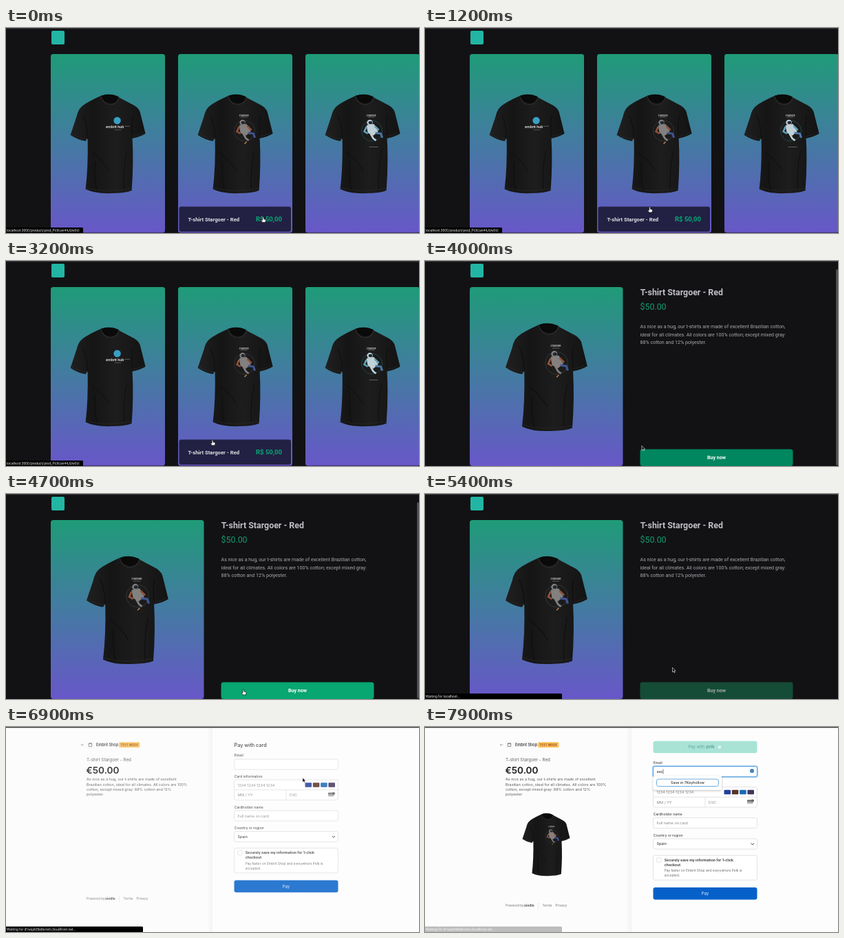
An HTML page that plays this animation: 600x299 px, repeating every 8 s.

```html
<!DOCTYPE html>
<html lang="en">
<head>
<meta charset="utf-8">
<title>Shop checkout</title>
<style>
  html, body { margin: 0; width: 100%; height: 100%; overflow: hidden; background: #121214; }
  svg { display: block; width: 100vw; height: 100vh; }
  .shop { font-family: Roboto, sans-serif; }
  .pay { font-family: Inter, sans-serif; }
  .status { font-family: Roboto, sans-serif; font-size: 5px; }
</style>
</head>
<body>
<svg id="stage" viewBox="0 0 600 299" preserveAspectRatio="none"></svg>
<script>
const LOOP = 8000;
const T = { product: 3700, scrollEnd: 4800, buy: 5100, checkout: 6600, shirt: 7250, focus: 7350, typing: 7600, shift: 7700 };
const PRODUCT = 'T-shirt Stargoer - Red';
const SHOP = 'Embrit Shop';
const SHIFT = 10.5;

const rect = (x, y, w, h, fill, r = 0, more = '') =>
  `<rect x="${x}" y="${y}" width="${w}" height="${h}" rx="${r}" fill="${fill}" ${more}/>`;
const text = (x, y, size, fill, str, more = '') =>
  `<text x="${x}" y="${y}" font-size="${size}" fill="${fill}" ${more}>${str}</text>`;
const path = (d, more) => `<path d="${d}" ${more}/>`;
const group = (id, body, more = '') => `<g id="${id}" ${more}>${body}</g>`;
const BOLD = 'font-weight="700"', SEMI = 'font-weight="600"', MEDIUM = 'font-weight="500"', MID = 'text-anchor="middle"';

const defs = `<defs>
  <linearGradient id="card" x2="0" y2="1"><stop stop-color="#1f9b78"/><stop offset=".5" stop-color="#447aa2"/><stop offset="1" stop-color="#6857c8"/></linearGradient>
  <linearGradient id="cloth"><stop stop-color="#202020"/><stop offset=".3" stop-color="#151515"/><stop offset=".6" stop-color="#1d1d1d"/><stop offset="1" stop-color="#131313"/></linearGradient>
  <linearGradient id="edge"><stop stop-color="#000" stop-opacity="0"/><stop offset="1" stop-color="#000" stop-opacity=".035"/></linearGradient>
  <filter id="soft" x="-20%" y="-40%" width="140%" height="200%"><feDropShadow dx="0" dy="1.2" stdDeviation="1.8" flood-opacity=".25"/></filter>
</defs>`;

const cloth =
  path('M44 2Q24 11 17 17Q11 22 9 32L0 59Q10 66 22 68L25 63Q26 105 22 138Q36 145 60 144Q80 144 89 140Q92 100 90 64Q101 62 109 57L101 25Q98 18 89 14L70 4Q58-3 44 2Z', 'fill="url(#cloth)"') +
  path('M44 2Q57-3 70 3Q68 13 58 13Q48 12 44 2Z', 'fill="#0a0a0a"') +
  path('M44 2Q47 14 58 15Q68 14 71 4', 'fill="none" stroke="#2b2b2b" stroke-width="1.2"') +
  path('M18 30Q25 45 25 65M91 62Q87 48 91 30M36 98Q34 125 39 140M82 82Q76 112 78 139M30 84Q44 92 56 112', 'fill="none" stroke="#0b0b0b" stroke-width="1" opacity=".7"') +
  path('M2 57Q12 64 23 65M90 61Q100 60 107 55M23 136Q50 144 89 137', 'fill="none" stroke="#2a2a2a" stroke-width=".6"');

const astronaut = (suit, arm, leg, ring) =>
  text(67, 31.5, 2.7, '#c4c4c4', 'STARGOER', MID + ' ' + BOLD) +
  rect(62, 32.8, 10, .6, '#777') +
  `<circle cx="68" cy="53" r="15" fill="none" stroke="${ring}" stroke-width=".6"/>` +
  path('M60 45L71 43L77 54L70 60L62 56Z', `fill="${suit}"`) +
  `<circle cx="65" cy="41" r="4.2" fill="${suit}"/><ellipse cx="65.8" cy="41" rx="2.8" ry="2.3" fill="#222933"/>` +
  path('M60 47L57 54L62 57M72 46L78 52', `fill="none" stroke="${arm}" stroke-width="2.6"`) +
  path('M73 56L81 57L83 63', `fill="none" stroke="${leg}" stroke-width="3"`) +
  path('M66 57L70 64L74 67', `fill="none" stroke="${suit}" stroke-width="2.6"`);

const prints = {
  badge: '<circle cx="68" cy="38" r="5.2" fill="#3a9fc4"/>' +
    text(51.5, 48.7, 5.4, '#d2d2d2', 'embrit hub', BOLD) + rect(78.5, 45.8, 8, .9, '#666') + rect(64, 51, 10, .7, '#666'),
  red: astronaut('#83807f', '#91533b', '#3f558f', '#424242') + path('M68 72L71 69', 'stroke="#c98662" stroke-width="1.3"'),
  aqua: astronaut('#c0d1d8', '#62a4b8', '#4d78a8', '#28606b') + rect(64, 76, 13, .9, '#666')
};
const shirt = (x, y, scale, print) =>
  `<g transform="translate(${x} ${y}) scale(${scale})">${cloth}${prints[print]}</g>`;

const statusBar = (w, str) => rect(-2, 291, w + 2, 10, '#000', 1.5) + text(1, 296.8, 5, '#e4e4e4', str);

const listPage = ['badge', 'red', 'aqua'].map((p, i) => {
  const x = 65 + 185 * i;
  return rect(x, 38, 166, 260.5, 'url(#card)', 3.5) + shirt(x + 28.6, 97, 1, p);
}).join('') +
  rect(251.5, 260.5, 162.5, 36.5, '#222143', 3) +
  text(264.5, 281.8, 7.7, '#dedee4', PRODUCT, BOLD) +
  text(363, 282.4, 9.5, '#08a878', 'R$ 50,00', BOLD) +
  group('url', statusBar(112, 'localhost:3000/product/prod_PcXcan44JUw0cI'), 'class="status"');

const productPage =
  rect(65, 38, 222.5, 261, 'url(#card)', 4) + shirt(117, 91, 1.09, 'red') +
  text(312.7, 50, 12.4, '#c0c0c6', PRODUCT, BOLD) +
  text(312.5, 71.2, 12.4, '#159b70', '$50.00') +
  ['As nice as a hug, our t-shirts are made of excellent Brazilian cotton,',
   'ideal for all climates. All colors are 100% cotton; except mixed gray:',
   '88% cotton and 12% polyester.'].map((s, i) => text(312.5, 98.3 + 11.3 * i, 7.1, '#a9a9b0', s)).join('') +
  rect(312.5, 274.5, 222, 24.5, '#00875f', 3.5, 'id="buy"') +
  text(423.5, 289.3, 7.1, '#fff', 'Buy now', `id="buyText" ${BOLD} ${MID}`) +
  rect(597, 12, 3, 286, '#505052', 1.5, 'id="scroll"') +
  group('waitLocal', statusBar(199, 'Waiting for localhost...'), 'class="status"');

const LINE = 'stroke="#dcdcdc" stroke-width=".8"';
const field = (y, h) => rect(331.5, y, 151, h, '#fff', 2.5, LINE);
const label = (y, s) => text(331.7, y, 5.1, '#4c4c4c', s, MEDIUM);
const hint = (x, y, s, fill = '#858585') => text(x, y, 5.4, fill, s);

const summary =
  path('M113.5 26H109.3M111 24.2L109.2 26L111 27.8', 'fill="none" stroke="#888" stroke-width=".6"') +
  rect(118, 21.5, 9, 9, '#fff', 1.5, 'stroke="#e6e6e6" stroke-width=".5"') +
  path('M120.3 24H124.7V28.4H120.3ZM120 24H125', 'fill="none" stroke="#555" stroke-width=".7"') +
  text(131, 28, 5.5, '#222', SHOP, MEDIUM) +
  rect(164, 22, 30.5, 8, '#fbc567', 1.8) + text(179.2, 27.6, 4.4, '#a5570f', 'TEST MODE', BOLD + ' ' + MID) +
  text(117, 50.3, 6.3, '#626262', PRODUCT) +
  text(116.5, 68, 13.6, '#1c1c1c', '€50.00', SEMI) +
  ['As nice as a hug, our t-shirts are made of excellent',
   'Brazilian cotton, ideal for all climates. All colors are 100%',
   'cotton; except mixed gray: 88% cotton and 12%',
   'polyester.'].map((s, i) => text(117, 78.4 + 7.3 * i, 5.45, '#5c5c5c', s)).join('') +
  group('payShirt', shirt(141.5, 126, .633, 'red')) +
  group('footer', text(117, 251.8, 4.8, '#777', 'Powered by') + text(144, 251.8, 5, '#555', 'zindle', BOLD) +
    rect(164, 246, .5, 9, '#d8d8d8') + text(170.5, 251.8, 4.8, '#777', 'Terms') + text(189.5, 251.8, 4.8, '#777', 'Privacy'));

const form =
  label(43.2, 'Email') + field(47, 15) +
  label(74, 'Card information') + field(77, 29.5) +
  path('M331.5 91.7H482.5M407 91.7V106.5', `fill="none" ${LINE}`) +
  hint(336.5, 86.6, '1234 1234 1234 1234') + hint(336.5, 101.2, 'MM / YY') + hint(411.5, 101.2, 'CVC') +
  ['#23409b', '#573329', '#1769b8', '#41355a'].map((c, i) => rect(434.5 + 11.3 * i, 81.2, 9.6, 6.6, c, 1)).join('') +
  rect(468, 95.3, 8.5, 6, '#aaa', 1) + rect(468, 96.6, 8.5, 1.2, '#555') + '<circle cx="476" cy="97" r="2" fill="#666"/>' +
  label(118.6, 'Cardholder name') + field(122, 15) + hint(336.5, 131.5, 'Full name on card') +
  label(149, 'Country or region') + field(152.5, 15) + hint(336.5, 161.9, 'Spain', '#222') +
  path('M473.6 159L475.8 161.2L478 159', 'fill="none" stroke="#333" stroke-width="1"') +
  field(176.7, 36) + rect(336.5, 180.3, 6.5, 6.5, '#fff', 1.4, LINE) +
  text(347.7, 185.4, 5.2, '#2c2c2c', 'Securely save my information for 1-click', SEMI) +
  text(347.7, 192.4, 5.2, '#2c2c2c', 'checkout', SEMI) +
  text(347.7, 200.8, 4.8, '#6c6c6c', `Pay faster on ${SHOP} and everywhere Pelk is`) +
  text(347.7, 207.5, 4.8, '#6c6c6c', 'accepted.') +
  rect(331.5, 223.5, 151, 17.7, '#0561c9', 3) + text(407, 234.6, 6, '#c3dbf5', 'Pay', MEDIUM + ' ' + MID) +
  group('focus',
    rect(330.8, 46.3, 152.4, 16.4, 'none', 3, 'stroke="#b5d9f5" stroke-width="2"') +
    rect(331.5, 47, 151, 15, '#fff', 2.5, 'stroke="#4598dc" stroke-width=".9"') +
    '<circle cx="475" cy="53.6" r="3" fill="#4584b8"/>' +
    text(336.5, 56.4, 5.4, '#222', '', 'id="typed"') + rect(336.5, 51, .6, 7, '#222', 0, 'id="caret"') +
    rect(331.5, 60.7, 99.5, 20.5, '#fff', 2.5, 'filter="url(#soft)"') +
    rect(336.5, 65.5, 90, 10.5, '#fff', 3, 'stroke="#4a97d8" stroke-width=".8"') +
    text(381.5, 72.6, 5.3, '#333', 'Save in 7Keyhollow', MEDIUM + ' ' + MID));

const checkoutPage =
  rect(0, 0, 600, 299, '#fcfcfc') + rect(300, 0, 300, 299, '#fdfdfd') + rect(292, 0, 8, 299, 'url(#edge)') +
  group('payBody', summary +
    text(331.5, 28.6, 7.3, '#333', 'Pay with card', 'id="payTitle" ' + MEDIUM) +
    group('quick', rect(331.5, 20.5, 151, 17.5, '#a9e3d6', 3) +
      text(382.5, 31.4, 6, '#64a899', `Pay with <tspan ${BOLD}>pelk</tspan>`) + '<circle cx="428" cy="29.3" r="2.4" fill="#dcf5ee"/>') +
    group('form', form)) +
  group('waitPay', statusBar(199, 'Waiting for d1wqzb5bdbcre6.cloudfront.net...'), 'class="status"');

const hand = path('M-.9 0Q0-1 .9 0V2.6L3.4 3.3Q4.2 3.6 4 4.6L3.3 7.4H-.9L-2.8 4.6Q-2.6 3.5-.9 4.6Z', 'fill="#fff" stroke="#111" stroke-width=".7"');
const arrow = path('M0 0V6.6L1.5 5.2L2.5 7.5L3.6 7L2.6 4.8H4.6Z', 'fill="#000" stroke="#fff" stroke-width=".6"');

const stage = document.getElementById('stage');
stage.innerHTML = defs + rect(0, 0, 600, 299, '#121214') +
  group('shop', rect(66, 4, 19, 20, '#22b5a3', 2) + group('list', listPage) + group('product', productPage), 'class="shop"') +
  group('checkout', checkoutPage, 'class="pay"') +
  rect(0, 0, 600, 1.2, '#39393b') +
  group('cursor', group('hand', hand) + group('arrow', arrow));

const el = {};
stage.querySelectorAll('[id]').forEach(n => { el[n.id] = n; });

// time, x, y of the pointer tip
const route = [
  [0, 373.5, 276], [250, 373.5, 276], [1100, 326.5, 261.5], [2100, 326.5, 261.5], [3000, 300, 261.5],
  [3750, 300, 261.5], [4400, 345, 285.5], [5150, 345, 285.5], [6050, 421.5, 115], [6400, 421.5, 115],
  [6850, 431.5, 75], [7250, 418, 53], [LOOP, 418, 53]
];
const clamp = v => Math.max(0, Math.min(1, v));
const ramp = (t, from, ms) => clamp((t - from) / ms);
const show = (node, on) => { node.style.display = on ? '' : 'none'; };

function pointer(t) {
  const i = Math.max(1, route.findIndex(k => k[0] >= t));
  const [a, b] = [route[i - 1], route[i]];
  const p = ramp(t, a[0], b[0] - a[0]), e = p * p * (3 - 2 * p);
  return [a[1] + (b[1] - a[1]) * e, a[2] + (b[2] - a[2]) * e];
}

function draw(t) {
  const paying = t >= T.checkout, shifted = t >= T.shift;
  const [x, y] = pointer(t);
  const onBuy = t > T.product && x > 312 && y > 274;
  const bought = t >= T.buy;

  show(el.shop, !paying);
  show(el.list, t < T.product);
  show(el.product, t >= T.product);
  show(el.scroll, t < T.scrollEnd);
  show(el.waitLocal, bought);
  el.buy.setAttribute('fill', bought ? '#154c37' : onBuy ? '#08a670' : '#00875f');
  el.buyText.setAttribute('fill', bought ? '#a2aaa7' : '#fff');

  show(el.checkout, paying);
  el.payBody.setAttribute('opacity', .85 * ramp(t, T.checkout, 250) + .15 * ramp(t, 6900, 250));
  el.payShirt.setAttribute('opacity', ramp(t, T.shirt, 150));
  show(el.payTitle, !shifted);
  show(el.quick, shifted);
  const move = `translate(0 ${shifted ? SHIFT : 0})`;
  el.form.setAttribute('transform', move);
  el.footer.setAttribute('transform', move);
  el.waitPay.setAttribute('opacity', 1 - .75 * ramp(t, T.shift, 200));

  show(el.focus, t >= T.focus);
  const count = t < T.typing ? 0 : Math.min(3, 1 + Math.floor((t - T.typing) / 130));
  el.typed.textContent = 'sas'.slice(0, count);
  el.caret.setAttribute('x', 336.7 + 3 * count);

  show(el.cursor, t < T.typing);
  el.cursor.setAttribute('transform', `translate(${x} ${y})`);
  const clickable = t < T.product || (onBuy && !bought);
  show(el.hand, clickable);
  show(el.arrow, !clickable);
}

const start = performance.now();
function tick() {
  draw((performance.now() - start) % LOOP);
  requestAnimationFrame(tick);
}
tick();
</script>
</body>
</html>
```
